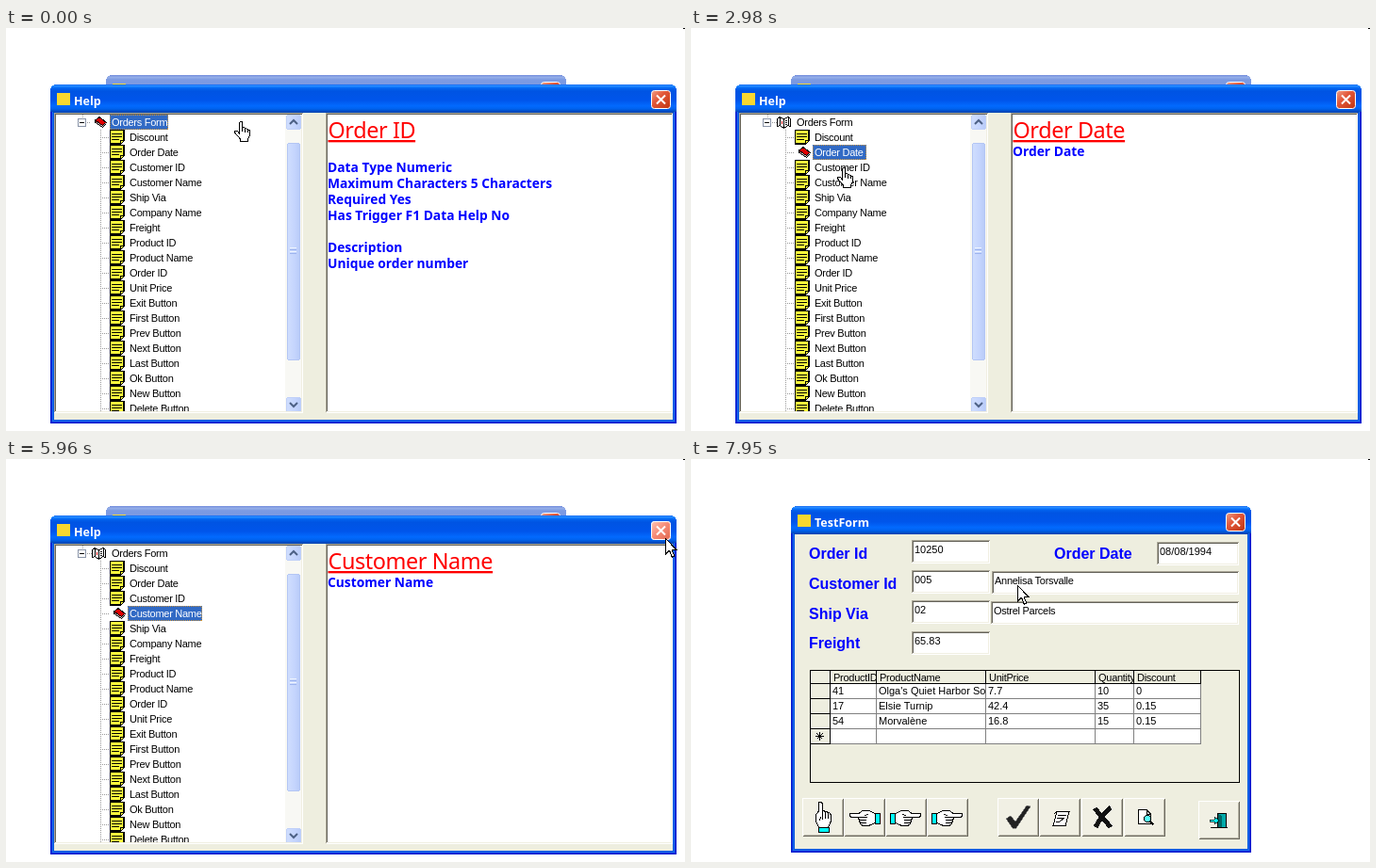
These frames come from a looping animation (720x428 px, 8 s). An HTML page:

```html
<!DOCTYPE html>
<html lang="en">
<head>
<meta charset="utf-8">
<title>Help window and order form</title>
<style>
html, body { margin: 0; width: 100%; height: 100%; overflow: hidden; background: #fff; }
#stage { display: block; width: 720px; height: 428px; shape-rendering: crispEdges; }
text { font: 11px "Liberation Sans", Arial, sans-serif; letter-spacing: -.27px; white-space: pre; }
.num { letter-spacing: 0; }
.cap { font: bold 12.5px "Open Sans", sans-serif; letter-spacing: 0; fill: #fff; }
.head { font: 23.4px "Noto Sans", sans-serif; letter-spacing: -.4px; fill: #f00; text-decoration: underline; }
.body { font: bold 13.8px "Noto Sans", sans-serif; letter-spacing: 0; fill: #00f; }
.label { font: bold 16px "Liberation Sans", Arial, sans-serif; letter-spacing: 0; fill: #00f; }
.timed { visibility: hidden; animation: 8s step-end infinite; }
</style>
</head>
<body>
<svg id="stage" viewBox="0 0 720 428" xmlns="http://www.w3.org/2000/svg">
<defs>
  <linearGradient id="on" x2="0" y2="1">
    <stop offset="0" stop-color="#0058ee"/><stop offset=".04" stop-color="#3593ff"/>
    <stop offset=".08" stop-color="#127dff"/><stop offset=".14" stop-color="#0262ee"/>
    <stop offset=".24" stop-color="#0054e3"/><stop offset=".56" stop-color="#0055eb"/>
    <stop offset=".76" stop-color="#026afe"/><stop offset=".86" stop-color="#0062ef"/>
    <stop offset="1" stop-color="#0040ab"/>
  </linearGradient>
  <linearGradient id="off" x2="0" y2="1">
    <stop offset="0" stop-color="#6a84da"/><stop offset=".07" stop-color="#97b0e9"/>
    <stop offset=".16" stop-color="#7c9ae2"/><stop offset="1" stop-color="#7b96e1"/>
  </linearGradient>
  <linearGradient id="red" x2="1" y2="1">
    <stop offset="0" stop-color="#f0a088"/><stop offset=".4" stop-color="#e2583a"/><stop offset="1" stop-color="#bf3410"/>
  </linearGradient>
  <linearGradient id="hot" x2="1" y2="1">
    <stop offset="0" stop-color="#ffc4b4"/><stop offset=".5" stop-color="#f58874"/><stop offset="1" stop-color="#e06a50"/>
  </linearGradient>
  <linearGradient id="thumb">
    <stop offset="0" stop-color="#d0defe"/><stop offset=".6" stop-color="#c4d4fd"/><stop offset="1" stop-color="#b8cbf8"/>
  </linearGradient>
  <g id="note">
    <path d="M.5.5H15.5V11.5L11.5 15.5H.5z" fill="#ffff3c" stroke="#000"/>
    <path d="M2 4.5H13M2 7.5H13M2 10.5H10M11.5 15V11.5H15M14.5 1V11M1 14.5H11" fill="none" stroke="#000"/>
  </g>
  <g id="closed" stroke="#000">
    <path d="M.5 4L5 .5 12.5 6.5 8.5 11.5 .5 6z" fill="#800000"/>
    <path d="M.5 4L5 .5 12.5 6.5 8.5 9.5z" fill="#e00000"/>
    <path d="M2 6L8.5 10.5 12 7" fill="none" stroke="#fff" stroke-width=".7"/>
  </g>
  <g id="open" fill="#fff" stroke="#000">
    <path d="M.5 2.5L3 .5 7.5 3 12 .5 14.5 2.5V10.5L12 9.5 7.5 12.5 3 9.5 .5 10.5z"/>
    <path d="M7.5 3V12M3 1V9.5M12 1V9.5M9 5l2-1M9 7l2-1M9 9l2-1" fill="none"/>
    <path d="M5 4.5V8" stroke="#c00"/>
  </g>
  <g id="hand" fill="#fff" stroke="#000" stroke-linejoin="round">
    <path d="M5.5 13.5V2q0-1.5 1.5-1.5T8.5 2V7q2.5-.7 3 1 2-.7 2.7 1 2-.3 2.3 1.5V15l-2 4v2.5H6.5V19L1 12.5q-1-2 1-2.5 1.5 0 3.5 3.5z"/>
    <path d="M8.5 7V11M11.5 8V11.5M14.5 9V12" fill="none"/>
  </g>
  <path id="arrow" d="M.5.5V17l4-3.8 2.8 7 2.6-1L7.100 12.500H12z" fill="#fff" stroke="#000"/>
  <path id="beam" d="M1 .5H3.500L4.500 1.500 5.500.5H8M4.500 1.500V14.500M1 15.500H3.500L4.500 14.500 5.500 15.500H8" fill="none" stroke="#000"/>
  <g id="point" fill="#fff" stroke="#000">
    <path d="M.5 5.500H5.500V16.500H.5z" fill="#0ff"/>
    <path d="M5.500 6l7-4h6l4 3h9q3 2 0 4h-9q2 1 0 3 1 2-1 3 0 2-2 3H11.500L5.500 15.500z"/>
    <path d="M14 9h8M15 12h7M15 15h6M13 6l4 2" fill="none"/>
  </g>
</defs>
</svg>
<script>
const LOOP = 8000, FACE = '#eeeedf';
const css = [];

// Shows its body only from a to b milliseconds of each loop.
function during(a, b, body) {
  const name = `t${a}-${b}`, pct = ms => ms / LOOP * 100 + '%';
  css.push(`@keyframes ${name}{0%{visibility:hidden}${pct(a)}{visibility:visible}` +
    `${pct(b)}{visibility:${b < LOOP ? 'hidden' : 'visible'}}}`);
  return `<g class="timed" style="animation-name:${name}">${body}</g>`;
}
const rect = (x, y, w, h, fill, more = '') =>
  `<rect x="${x}" y="${y}" width="${w}" height="${h}" fill="${fill}" ${more}/>`;
const line = (d, color, more = '') => `<path d="${d}" fill="none" stroke="${color}" ${more}/>`;
const text = (x, y, s, cls = '', more = '') => `<text x="${x}" y="${y}" class="${cls}" ${more}>${s}</text>`;
const use = (id, x, y) => `<use href="#${id}" x="${x}" y="${y}"/>`;

// Sunken two-pixel edge.
const sunken = (x, y, w, h) =>
  line(`M${x + .5} ${y + h - 1}V${y + .5}H${x + w}`, '#aca899') +
  line(`M${x + 1.5} ${y + h - 2}V${y + 1.5}H${x + w - 1}`, '#65635a') +
  line(`M${x + 1} ${y + h - .5}H${x + w - .5}V${y + 1}`, '#fff') +
  line(`M${x + 2} ${y + h - 1.5}H${x + w - 1.5}V${y + 2}`, '#f1efe2');

function closeBox(x, y, fill = 'red') {
  return rect(x + .5, y + .5, 20, 19, `url(#${fill})`, 'rx="3" stroke="#fff" shape-rendering="auto"') +
    line(`M${x + 6} ${y + 5.5}l9 9m0-9l-9 9`, '#fff', 'stroke-width="2" shape-rendering="auto"');
}

function frame(x, y, w, h, title, closeY, on = true) {
  const side = (inset, color) =>
    line(`M${x + inset} ${y + 29}V${y + h - inset}H${x + w - inset}V${y + 29}`, color);
  return rect(x, y + 29, w, h - 29, on ? '#0855dd' : '#7b97e0') +
    `<path d="M${x} ${y + 30}V${y + 7}q0-7 7-7H${x + w - 7}q7 0 7 7V${y + 30}z" fill="url(#${on ? 'on' : 'off'})"/>` +
    (on ? side(.5, '#0019cf') + side(1.5, '#0831d9') + side(2.5, '#166aee') : '') +
    rect(x + 4, y + 30, w - 8, h - 34, FACE) +
    rect(x + 7, y + 9, 14, 13, '#f8d830') +
    text(x + 25, y + 22, title, 'cap') + closeBox(x + w - 27, closeY);
}
const formFrame = on => frame(106, 50, 488, 368, 'TestForm', 57, on);

// ---- Help window ----
const items = ['Orders Form', 'Discount', 'Order Date', 'Customer ID', 'Customer Name', 'Ship Via', 'Company Name',
  'Freight', 'Product ID', 'Product Name', 'Order ID', 'Unit Price', 'Exit Button', 'First Button', 'Prev Button',
  'Next Button', 'Last Button', 'Ok Button', 'New Button', 'Delete Button'];
const selWidth = [62, 46, 57, 62, 79];
const rowY = i => 100 + 16 * i;
const rowX = i => i ? 131 : 112;

function scrollBar() {
  const button = (y, d) => rect(297.5, y + .5, 15, 15, 'url(#thumb)', 'rx="2" stroke="#c0d0f8"') +
    line(d, '#4d6185', 'stroke-width="2" shape-rendering="auto"');
  let s = rect(296, 92, 17, 316, '#f8f8f4') + button(92, 'M301 102l4-4 4 4') + button(392, 'M301 398l4 4 4-4') +
    rect(298.5, 122.5, 13, 230, 'url(#thumb)', 'rx="2" stroke="#b4c6f4"');
  for (let i = 0; i < 4; i++) s += line(`M301 ${233.5 + 2 * i}h7`, i % 2 ? '#9db4ee' : '#eef4fe');
  return s;
}

function helpWindow() {
  let rows = line('M81.500 92V95M100.500 108V408M86 100.500H92', '#999', 'stroke-dasharray="1 1"') +
    rect(76.5, 96.5, 8, 8, '#fff', 'stroke="#8a94a8"') + line('M78 100.500h5', '#000') + use('open', 91, 94);
  items.forEach((s, i) => {
    if (i) rows += line(`M100 ${rowY(i) + .5}h10`, '#999', 'stroke-dasharray="1 1"') + use('note', 110, rowY(i) - 8);
    rows += text(rowX(i), rowY(i) + 4, s);
  });
  return frame(47, 60, 664, 360, 'Help', 66) +
    rect(51, 90, 264, 319, '#fff') + `<svg width="314" height="408">${rows}</svg>` + scrollBar() +
    sunken(51, 90, 264, 319) + rect(340, 90, 367, 319, '#fff') + sunken(339, 90, 368, 319);
}

const highlight = i => rect(rowX(i) - 2, rowY(i) - 8, selWidth[i], 16, '#316ac5') +
  rect(rowX(i) - 1.5, rowY(i) - 7.5, selWidth[i] - 1, 15, 'none', 'stroke="#ce953a" stroke-dasharray="1 1"') +
  text(rowX(i), rowY(i) + 4, items[i], '', 'fill="#fff"');
const marker = i => rect(i ? 109 : 90, rowY(i) - 8, i ? 18 : 19, 16, '#fff') +
  use('closed', i ? 114 : 94, rowY(i) - 6);

function page(title, y, lines) {
  return text(341.5, 117, title, 'head') +
    lines.map((s, i) => s && text(341, y + 17 * i, s, 'body')).join('');
}
const pages = [
  page('Order ID', 153, ['Data Type Numeric', 'Maximum Characters 5 Characters', 'Required Yes',
    'Has Trigger F1 Data Help No', '', 'Description', 'Unique order number']),
  page('Discount', 136, ['Product Discount']),
  page('Order Date', 136, ['Order Date']),
  page('Customer ID', 136, ['Same entry as in Customers table.']),
  page('Customer Name', 136, ['Customer Name'])
];
const topic = (i, mark = i) => marker(mark) + highlight(i) + pages[mark];

// ---- Order form ----
const boxes = [
  [234, 86, 83, '10250'], [494, 88, 87, '08/08/1994'], [234, 118, 83, '005'], [319, 119, 262, 'Annelisa Torsvalle'],
  [234, 150, 83, '02'], [318, 151, 263, 'Ostrel Parcels'], [234, 183, 83, '65.83']
];
const boxEdge = ([x, y, w]) => sunken(x, y, w, 25);
const boxText = ([x, y, , s]) => text(x + 3, y + 14, s, /^\d/.test(s) ? 'num' : '');
const gridEdge = rect(126.5, 224.5, 455, 119, 'none', 'stroke="#000"');

function grid() {
  const cols = [148, 197, 313, 429, 470, 541];
  const data = [
    ['ProductID', 'ProductName', 'UnitPrice', 'Quantity', 'Discount'],
    ['41', "Olga's Quiet Harbor Soup Mix", '7.7', '10', '0'],
    ['17', 'Elsie Turnip', '42.4', '35', '0.15'],
    ['54', 'Morvalène', '16.8', '15', '0.15'],
    ['', '', '', '', '']
  ];
  let s = rect(148, 239, 392, 64, '#fff');
  data.forEach((row, r) => {
    const y = r ? 223 + 16 * r : 225;
    row.forEach((v, c) => {
      const w = cols[c + 1] - cols[c];
      s += `<svg x="${cols[c]}" y="${y}" width="${w - 1}" height="15">${text(r ? 2 : 3, 11, v, r ? 'num' : '')}</svg>` +
        line(`M${cols[c + 1] - .5} ${y}v${r ? 16 : 14}`, r ? '#808080' : '#000');
    });
    s += line(`M148 ${r ? y + 15.5 : 238.5}H541`, r ? '#808080' : '#000') +
      line(`M127 ${r ? y + 15.5 : 238.5}H148`, '#000');
  });
  return s + line('M147.500 225V303', '#000') + line('M132 294.500h9M136.500 290v9M133.500 291.500l6 6m0-6l-6 6', '#000') + gridEdge;
}

const button = (x, y, icon) => rect(x, y, 44, 41, '#f1f0e4') +
  line(`M${x + .5} ${y + 40}V${y + .5}H${x + 43}`, '#fff') +
  line(`M${x + 1} ${y + 40.5}H${x + 43.500}V${y + 1}`, '#6b695f') +
  line(`M${x + 2} ${y + 39.500}H${x + 42.500}V${y + 2}`, '#b5b2a4') +
  `<g transform="translate(${x} ${y})">${icon}</g>`;
const pointer = turn => `<use href="#point" transform="${turn}"/>`;
const pointRight = pointer('translate(5 11)');
const icons = {
  tick: '<path d="M9 22l5-3 5 6L31 8l4 1L20 32H16z" fill="#222" stroke="#777" stroke-width=".7"/>',
  notes: '<path d="M19 14.500H32L28 29.500H15z" fill="#fff" stroke="#000"/>' +
    line('M20 18h9M19 21h8M18 25h4l4-3M16 17l3-3', '#000'),
  cross: line('M14 11L31 31M31 10Q20 20 15 31', '#111', 'stroke-width="5"'),
  find: '<path d="M15.500 12.500H24L28.500 17V27.500H15.500z" fill="#fff" stroke="#000"/>' + line('M24 12.500V17h4.500', '#000') +
    '<circle cx="25" cy="22" r="3.500" fill="#5ff" stroke="#000"/>' + line('M27.500 24.500l4 4', '#000', 'stroke-width="2"'),
  exit: '<path d="M20.500 13.500H29.500V28.500H20.500z" fill="#0aa" stroke="#000"/>' +
    '<path d="M20.500 13.500L25 16V28.500H20.500z" fill="#066"/>' +
    '<path d="M12 20h5v-3l5 4-5 4v-3H12z" fill="#0ff" stroke="#000" stroke-width=".7"/>' + line('M13 28.500H31', '#000')
};

function filledForm() {
  return text(385, 106, 'Order Date', 'label') + text(125, 138, 'Customer Id', 'label') +
    text(125, 170, 'Ship Via', 'label') + text(125, 201, 'Freight', 'label') +
    boxes.map(b => rect(b[0], b[1], b[2], 25, '#fff') + boxEdge(b)).join('') + grid() +
    button(118, 360, pointer('translate(12 37) rotate(-90)')) +
    button(162, 360, pointer('translate(39 11) scale(-1 1)')) + button(206, 360, pointRight) +
    button(325, 360, icons.tick) + button(369, 360, icons.notes) +
    button(414, 360, icons.cross) + button(459, 360, icons.find) + button(538, 363, icons.exit);
}

// Parts of the closed window that stay until their control is painted.
const leftover = (id, holes) => `<clipPath id="${id}">${holes.map(h => rect(...h, '#000')).join('')}</clipPath>` +
  `<g clip-path="url(#${id})">${helpWindow() + topic(4)}</g>`;
const labelHole = [122, 88, 112, 25];
const unpainted = [labelHole, [382, 88, 112, 25], [122, 120, 112, 25], [122, 152, 112, 25], [122, 183, 112, 25],
  ...boxes.map(([x, y, w]) => [x, y, w, 25]), [126, 224, 456, 120],
  [118, 360, 132, 41], [251, 360, 44, 41], [325, 360, 44, 41], [370, 360, 44, 41], [415, 360, 44, 41],
  [460, 360, 44, 41], [538, 363, 44, 41]];

const cursors = [
  ['hand', 0, 242, 99], ['hand', 660, 210, 122], ['hand', 990, 142, 113], ['hand', 1990, 149, 131],
  ['hand', 2650, 151, 135], ['hand', 2980, 155, 148], ['hand', 3980, 163, 164], ['hand', 4640, 163, 165],
  ['arrow', 4970, 626, 86], ['arrow', 5630, 653, 83], ['arrow', 5960, 699, 84],
  ['beam', 6960, 665, 97], ['beam', 7620, 526, 124], ['arrow', 7950, 346, 134]
];

const scene = rect(0, 0, 720, 428, '#fff') + rect(718, 0, 2, 1, '#000') +
  during(0, 6960, formFrame(false) + helpWindow()) +
  during(0, 1990, topic(0)) +
  during(1990, 2650, topic(1)) +
  during(2650, 3980, topic(2)) +
  during(3980, 4640, topic(3)) +
  during(4640, 4970, topic(4, 3)) +
  during(4970, 6960, topic(4)) +
  during(5960, 6960, closeBox(684, 66, 'hot')) +
  during(6960, LOOP, formFrame(true)) +
  during(6960, 7620, leftover('bare', unpainted) + boxes.map(boxEdge).join('') + gridEdge) +
  during(7620, LOOP, filledForm()) +
  during(7620, 7950, leftover('late', [labelHole, [236, 100, 79, 9], [250, 360, 45, 41]])) +
  during(7620, LOOP, boxes.map(boxText).join('')) +
  during(7950, LOOP, text(125, 106, 'Order Id', 'label') + button(250, 360, pointRight)) +
  cursors.map(([id, at, x, y], i) => during(at, i + 1 < cursors.length ? cursors[i + 1][1] : LOOP, use(id, x, y))).join('');

document.getElementById('stage').insertAdjacentHTML('beforeend', scene);
document.head.insertAdjacentHTML('beforeend', `<style>${css.join('\n')}</style>`);
</script>
</body>
</html>
```
